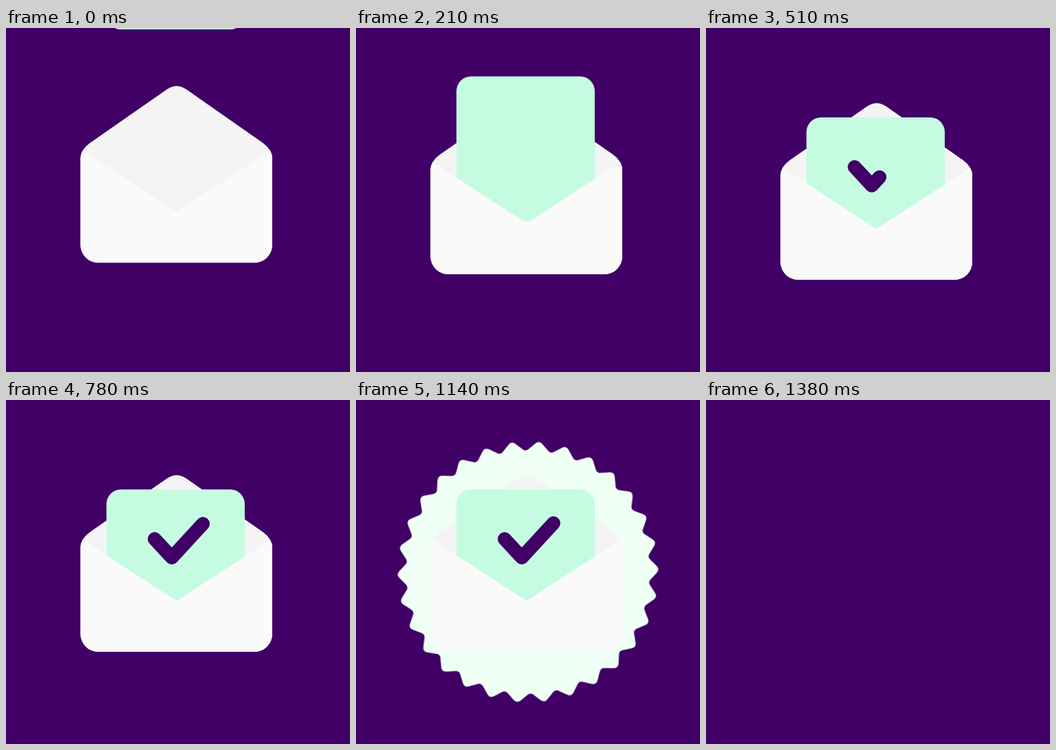
An HTML page that plays this animation: 500 by 500 pixels, repeating every 1410 ms.

```html
<!DOCTYPE html>
<html lang="en">
<head>
<meta charset="utf-8">
<title>Envelope</title>
<style>
  html, body { margin: 0; width: 100%; height: 100%; overflow: hidden; background: #400066; }
  svg { display: block; width: 100%; height: 100%; }

  /* Phases: card 0-390, envelope 0-540, check 390-840, badge 840-1380, blank until 1410 ms */
  svg * {
    --ease: cubic-bezier(.333, .77, .667, 1);
    animation-duration: 1410ms;
    animation-iteration-count: infinite;
    animation-timing-function: var(--ease);
  }
  #scene { animation-name: cut; animation-timing-function: step-end; }
  .envelope { animation-name: sink; }
  #card { animation-name: drop; }
  #check { animation-name: draw; stroke-dasharray: 1 2; }
  #mark { animation-name: show; animation-timing-function: step-end; }
  #badge { animation-name: grow; transform-origin: 0 0; }

  @keyframes cut { 0% { visibility: visible; } 97.868%, 100% { visibility: hidden; opacity: 0; } }
  @keyframes sink { 0% { transform: translateY(0); } 38.298%, 100% { transform: translateY(25px); } }
  @keyframes drop { 0% { transform: translateY(-340px); } 27.66%, 100% { transform: translateY(0); } }
  @keyframes draw { 0%, 27.66% { stroke-dashoffset: 1; } 59.574%, 100% { stroke-dashoffset: 0; } }
  @keyframes show { 0% { opacity: 0; } 27.67%, 100% { opacity: 1; } }
  @keyframes grow {
    0%, 59.574% { transform: rotate(.9deg) scale(0); }
    97.872%, 100% { transform: rotate(5.6deg) scale(1); }
  }
</style>
</head>
<body>
<svg viewBox="0 0 500 500">
  <g id="scene">
    <g transform="translate(250 250)"><path id="badge" fill="#effff5"/></g>
    <path class="envelope" fill="#f4f4f4" d="M108.300 190Q108.300 176.600 122 167L234 89Q248 79.300 262 89L373.500 167Q387 176.600 387 190V315a26 26 0 0 1-26 26H134.300a26 26 0 0 1-26-26Z"/>
    <rect id="card" x="146" y="130" width="201" height="210" rx="21" fill="#c5fce1"/>
    <path class="envelope" fill="#fafafa" d="M108.300 190Q108.300 183 111.700 178.500L248 267L383.800 178.500Q387 183 387 190V315a26 26 0 0 1-26 26H134.300a26 26 0 0 1-26-26Z"/>
    <g id="mark">
      <path id="check" d="M216 202L241 229L287 179" pathLength="1" fill="none" stroke="#400066" stroke-width="20" stroke-linecap="round" stroke-linejoin="round"/>
    </g>
  </g>
</svg>
<script>
  // Rounded 30-tooth seal: even vertices are tips, odd ones valleys
  const TEETH = 30, TIP = 229, VALLEY = 209;
  const vertex = i => {
    const a = i * Math.PI / TEETH, r = i % 2 ? VALLEY : TIP;
    return [r * Math.sin(a), -r * Math.cos(a)];
  };
  const toward = (p, q, k) => p.map((v, j) => v + (q[j] - v) * k);
  const fmt = p => p.map(v => v.toFixed(2)).join(' ');

  let d = '';
  for (let i = 0; i < TEETH * 2; i++) {
    const p = vertex(i), k = i % 2 ? .2 : .28;
    const start = toward(p, vertex(i - 1), k), end = toward(p, vertex(i + 1), k);
    d += `${i ? 'L' : 'M'}${fmt(start)}Q${fmt(p)} ${fmt(end)}`;
  }
  document.getElementById('badge').setAttribute('d', d + 'Z');
</script>
</body>
</html>
```
